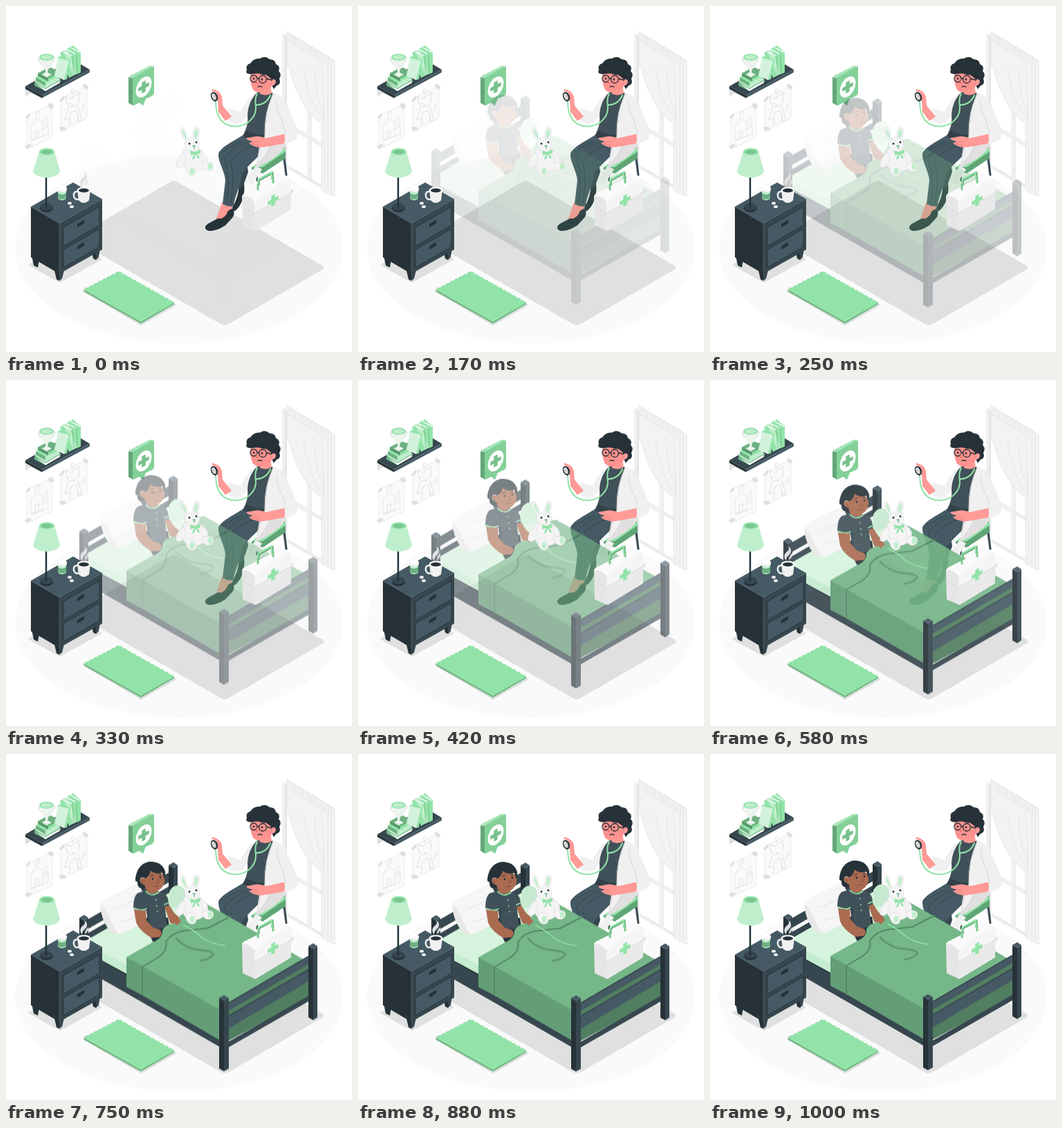
Recreate the animation shown at these times as an HTML page. Size 500 by 500 pixels, loop 1.04 s.

```html
<!DOCTYPE html>
<html lang="en">
<head>
<meta charset="utf-8">
<title>Home visit</title>
<style>
html, body { margin: 0; width: 100%; height: 100%; overflow: hidden; background: #fff; }
svg { display: block; width: 100vw; height: 100vh; }
.ink { fill: #263238; } .slate { fill: #37474f; } .steel { fill: #455a64; } .cloth { fill: #415159; }
.mint { fill: #92e3a9; } .pale { fill: #beeecb; } .leaf { fill: #6db181; }
.snow { fill: #fafafa; } .fog { fill: #f0f0f0; } .ash { fill: #e0e0e0; }
.rose { fill: #ff9a96; } .tan { fill: #aa6b50; } .white { fill: #fff; }
.line { fill: none; stroke-linecap: round; stroke-linejoin: round; }
</style>
</head>
<body>
<svg viewBox="0 0 500 500">
<defs>
  <path id="plus" d="M-2.7-8h5.4v5.3h5v5.4h-5v5.3h-5.4v-5.3h-5v-5.4h5z"/>
</defs>

<ellipse class="snow" cx="250" cy="351" rx="237" ry="137"/>
<path class="ash" d="M238 254Q242 251 247 254L457 375Q462 378 457 381L321 460Q316 463 311 460L97 336Z"/>

<g id="window">
  <path class="fog" d="M399 40L405 43V228L460 260V266L399 231Z"/>
  <path fill="#e6e6e6" d="M403 42L406 44V228L403 227Z"/>
  <path class="white" d="M406 44L456 74V258L406 229Z"/>
  <path class="fog" d="M435 90L441 94V250L435 247ZM406 168L457 197V203L406 174Z"/>
  <path class="line" stroke="#e4e4e4" d="M441 150V249M406 174L435 191M441 194L457 203M413 235L457 261"/>
  <path fill="#f3f3f3" d="M406 37L475 79V275L456 265V171C439 158 420 132 411 94L406 84Z"/>
  <path class="line" stroke="#e5e5e5" d="M406 37L475 79V275L456 266V171C439 158 420 132 411 94L406 84ZM407 50L474 90M430 88C433 115 442 145 459 164M446 92C447 117 450 140 461 157M456 82C459 120 460 150 460 266M465 87V270M470 90V273"/>
  <g id="pleats"></g>
</g>

<g id="drawings">
  <path class="snow" stroke="#ececec" d="M30 158L67 142V190L30 207Z"/>
  <path class="snow" stroke="#ececec" d="M79 133L117 115V162L79 181Z"/>
  <path class="line" stroke="#e3e3e3" d="M36 193V174L45 162L53 168V188ZM53 178L61 174V185L36 195M42 191V181L47 179V189M43 162V154L48 152V160M56 175V163L60 161V173"/>
  <path class="line" stroke="#dedede" d="M88 141L86 130L93 134L101 129L105 124L106 137C104 145 91 150 88 141ZM92 140H93M101 136H102M95 143L98 142M90 148L85 164H91L94 154L102 151L105 166H110L104 145M108 150Q114 151 112 140M93 165L92 172M103 160L104 168M97 128Q91 119 96 121Q102 117 97 128"/>
  <path class="ash" d="M27 202L35 199L37 203L30 207ZM60 142L66 140L70 145L64 149ZM28 162L33 155L36 157L31 163ZM77 175L84 174L88 179L79 181ZM110 114L115 113L120 118L115 121ZM77 137L83 130L85 133L80 139Z"/>
</g>

<g id="shelf">
  <path class="ash" d="M28 121V131L36 126L52 134V131Z"/>
  <path class="slate" d="M28 116L96 77L121 92L52 129Z"/>
  <path class="ink" d="M28 116L52 129V133L28 120Z"/>
  <path class="steel" d="M52 129L121 92V96L52 133Z"/>
  <path class="leaf" d="M41 111L63 99L80 108L57 123L41 115Z"/>
  <path class="pale" d="M41 109L62 97L79 106L57 119Z"/>
  <path class="white" d="M43 112L57 120L78 108V111L57 123Z"/>
  <path class="mint" d="M43 103L65 91L79 99L57 112Z"/>
  <path class="leaf" d="M43 103L57 111V116L43 108Z"/>
  <path class="pale" d="M57 111L79 99V103L57 116Z"/>
  <path class="leaf" d="M46 97L63 88L79 96L61 106Z"/>
  <path fill="#5a9a6e" d="M46 97L61 105V109L46 101Z"/>
  <path class="mint" d="M61 105L79 96V100L61 109Z"/>
  <path class="mint" d="M78 68L83 64L96 70L98 100L91 104Z"/>
  <path class="pale" d="M83 65L90 61L101 67L102 98L97 101Z"/>
  <path class="mint" d="M89 61L97 57L108 67V96L102 99Z"/>
  <path class="line" stroke="#f0f6f1" stroke-width="1.500" d="M82 66L95 72M88 63L100 69M94 60L106 67"/>
  <path class="line" stroke="#7cc290" d="M96 72L98 99M102 69L103 98"/>
  <path class="mint" d="M74 75L79 72L93 78L88 106L83 107Z"/>
  <path fill="#d3f2dc" d="M75 75L91 79L84 107L70 101Z"/>
  <path class="line" stroke="#d5dfd8" stroke-width="1.500" d="M50 74Q44 78 51 84M68 73Q73 77 67 82"/>
  <path fill="#edf3ee" d="M48 74L69 74Q69 88 61 91L60 96L66 99L59 103L52 99L57 96V91Q49 87 48 74Z"/>
  <ellipse cx="58.500" cy="74" rx="10.500" ry="5" class="mint"/>
  <ellipse cx="58.500" cy="74" rx="8" ry="3.300" class="pale"/>
</g>

<g id="bubble">
  <path fill="#a3e6b5" d="M177 102L208 86L214 88L184 104Z"/>
  <path fill="#66a67a" d="M177 103L184 104V144L177 140Z"/>
  <path class="leaf" d="M191 138L198 144L195 137Z"/>
  <path fill="#84d09a" d="M183 105Q183 103 186 102L211 88Q214 86 214 90V125Q214 128 211 130L202 134L198 144L194 139L186 143Q183 145 183 141Z"/>
  <ellipse class="white" transform="translate(199 117) skewY(-28)" rx="11.500" ry="14"/>
  <use href="#plus" fill="#78c18d" transform="translate(199 117) skewY(-28)"/>
</g>

<g id="doctor">
  <path class="line" stroke="#37474f" stroke-width="3" d="M401 176V212L405 244M361 238L363 252"/>
  <path class="mint" d="M355 233L388 209L404 206V212L371 234Z"/>
  <path fill="#5fa576" d="M355 233L371 233L404 210V220L371 242L355 236Z"/>
  <path class="fog" d="M345 253L361 231L370 236L356 259Z"/>
  <path class="rose" d="M312 284L328 287L324 304L303 310Z"/>
  <path class="ink" d="M337 254L344 256C346 272 341 289 330 297L327 291C333 282 337 268 337 254Z"/>
  <path class="ink" d="M288 319C290 314 300 311 306 307Q316 309 321 296L328 292Q331 299 328 305L317 317Q303 326 293 325Q287 323 288 319Z"/>
  <path class="slate" d="M342 190L350 240L342 262L331 266L326 230Z"/>
  <path class="steel" d="M346 184C333 194 313 201 307 213C306 225 316 238 317 252L313 286Q321 291 329 289C330 274 341 257 341 242C350 230 364 219 374 207L371 190Z"/>
  <path class="line" stroke="#37474f" d="M353 196C336 202 319 212 316 222C321 240 323 255 319 286M363 199C344 207 328 216 324 226Q331 244 325 286M311 212Q321 204 342 196"/>
  <path class="ash" d="M366 129L387 126Q403 136 406 160L403 204Q392 220 361 234L365 210L372 160Z"/>
  <path class="fog" d="M364 125C350 130 345 143 339 153L322 148L316 161Q328 174 341 168L355 151Z"/>
  <path class="cloth" d="M364 124Q374 120 386 126L381 142Q374 159 376 181L374 194Q358 198 342 188Q351 172 349 158Q350 137 364 124Z"/>
  <path class="ink" d="M343 188L348 179Q359 187 374 186V194Q357 197 343 188Z" opacity=".5"/>
  <path class="rose" d="M366 116L382 114L384 126Q376 131 367 127Z"/>
  <path class="fog" d="M386 125Q401 129 407 145L421 178Q424 193 412 197L390 202L383 194Q380 211 362 230L374 187Q375 151 386 125Z"/>
  <path class="line" stroke="#d7d7d7" d="M391 138Q391 151 400 168L404 186M388 188Q378 216 364 228M374 187Q373 153 386 128"/>
  <path class="rose" d="M402 185L376 191Q364 187 358 189L347 191Q348 194 357 196L351 198Q358 205 372 204L402 199Q404 191 402 185Z"/>
  <path class="line" stroke="#e5776f" stroke-width=".8" d="M358 196L365 197M355 199L365 201"/>
  <path class="rose" d="M326 160L313 144L312 131Q309 122 298 120L297 122L305 126L299 128L306 138L307 153L317 166Z"/>
  <path class="line" stroke="#92e3a9" stroke-width="2" d="M303 137C303 160 312 174 333 174C351 173 362 159 361 145Q359 134 363 127M382 129Q376 143 361 143"/>
  <ellipse class="ink" cx="301" cy="131" rx="4.800" ry="7" transform="rotate(-23 301 131)"/>
  <ellipse fill="#d7d7d7" cx="300.500" cy="131" rx="2.800" ry="5" transform="rotate(-23 300.500 131)"/>
  <path fill="#fd928e" d="M354 93Q369 89 385 97L386 112Q382 122 372 123Q365 128 357 121Q351 109 354 93Z"/>
  <path class="ink" d="M354 98Q345 99 348 92Q346 85 353 83Q358 75 367 76Q374 71 381 77Q389 77 390 84Q397 87 394 94Q399 99 395 105Q398 113 391 115L387 120L384 114L383 105Q377 99 371 98Q361 97 354 98Z"/>
  <path class="rose" d="M383 107Q390 104 390 110Q388 116 384 115Z"/>
  <circle class="ink" cx="387" cy="116" r="1.800"/>
  <g class="line" stroke="#263238" stroke-width="1.300">
    <circle cx="358" cy="105" r="5"/>
    <circle cx="371" cy="106" r="5.500"/>
    <path d="M363 105H366M376 105L384 107M354 98L359 97M368 98L374 99M364 117Q367 115 370 117"/>
  </g>
  <circle class="ink" cx="358" cy="105" r="1.400"/>
  <circle class="ink" cx="370" cy="106" r="1.400"/>
  <path class="line" stroke="#d96861" d="M363 106L361 111L364 112"/>
</g>

<g id="bed">
  <path class="ink" d="M106 235L113 239V306L106 302ZM235 159L242 163V226L235 222Z"/>
  <path class="slate" d="M113 239L119 235V302L113 306ZM242 163L248 159V222L242 226Z"/>
  <path class="steel" d="M106 235L113 231L119 235L113 239ZM235 159L242 155L248 159L242 163Z"/>
  <path class="slate" d="M119 237L235 170V184L119 251ZM119 257L235 190V211L119 278Z"/>
  <path class="ink" d="M119 283L308 392V421L119 312Z"/>
  <path class="slate" d="M113 283L308 395V421L113 309Z"/>
  <path fill="#d6f3de" d="M119 266L236 199L300 240L174 309L119 276Z"/>
  <path fill="#c4ecd0" d="M119 274L176 304V317L119 286Z"/>
  <path fill="#c6ead0" d="M236 197Q242 186 253 189L262 199L261 218L237 221Z"/>
  <path fill="#f6f6f6" d="M136 220Q134 212 148 206L181 189Q192 184 197 197L212 236L168 258Q156 261 149 252Q140 239 136 220Z"/>
  <path fill="#e8e8e8" d="M136 218Q143 219 148 232Q154 247 162 258Q154 261 147 250Q138 237 136 218Z"/>
  <path class="line" stroke="#e3e3e3" d="M158 222Q174 215 184 211M165 241L188 234"/>

  <g id="child">
    <path class="ink" d="M192 235H234L238 259L213 271L202 250Z"/>
    <path class="tan" d="M203 191H219L221 201Q211 207 202 199Z"/>
    <path class="cloth" d="M202 196Q211 204 221 197Q231 199 234 207L236 219L230 223L233 248Q222 254 206 251L203 225L184 222Q184 203 191 199Z"/>
    <path class="line" stroke="#92e3a9" stroke-width="1.700" d="M202 197Q211 206 221 198M185 221Q195 226 203 222M229 216L236 213"/>
    <path class="slate" d="M203 225Q207 217 204 211Q209 233 207 250Z"/>
    <g class="mint"><circle cx="217" cy="209" r="1"/><circle cx="218" cy="218" r="1"/><circle cx="219" cy="226" r="1"/></g>
    <path class="tan" d="M185 223L202 225L203 239L212 249L223 253Q227 258 222 263L210 264Q193 254 188 242Z"/>
    <path class="tan" d="M229 219L236 217L243 228L252 236V242L246 247L237 242Z"/>
    <path class="tan" d="M200 170Q213 161 226 172Q232 180 227 189Q222 197 213 197Q203 197 199 189L194 185Q192 175 200 178Z"/>
    <path class="ink" d="M190 183Q185 184 188 173Q192 157 207 154Q225 153 230 168Q231 174 228 177L226 170Q216 173 209 167Q207 176 201 178Q192 174 194 184L201 189Q202 194 197 193Q189 192 190 183Z"/>
    <path class="line" stroke="#824c3c" d="M196 181L199 185M219 179L221 184L218 185M214 190Q218 190 221 189"/>
    <path class="line" stroke="#263238" d="M209 175L213 173M221 173L224 173"/>
    <circle class="ink" cx="212" cy="179" r="1.400"/><circle class="ink" cx="223" cy="177" r="1.400"/>
  </g>

  <path fill="#75b788" d="M174 292L213 270Q227 264 226 253Q231 244 246 242L260 219L286 213L302 222L440 301L309 378Z"/>
  <path fill="#649e77" d="M174 292L309 368V412L197 347L174 335Z"/>
  <path fill="#517e60" d="M308 370L440 299V349L308 420Z"/>
  <path class="line" stroke="#55886a" stroke-width="2" d="M197 347V306L219 293Q234 283 231 270Q239 257 256 254L292 250L325 233"/>
  <path class="line" stroke="#5f9972" stroke-width="3" d="M246 265Q261 281 283 282Q302 284 299 289Q292 296 281 297"/>
  <path class="line" stroke="#92e3a9" stroke-width="1.500" d="M257 246Q272 253 282 263Q296 273 316 275"/>
  <path class="tan" d="M237 232L249 235L253 240L247 246L240 240Z"/>
  <path class="slate" d="M322 357L437 290V302L322 369ZM322 376L437 309V313L322 380Z"/>
  <path class="steel" d="M322 359L437 292V302L322 369ZM322 378L437 311V327L322 395Z"/>
  <path class="slate" d="M322 414L437 348V356L322 422Z"/>
  <path class="ink" d="M308 351L315 355V457L308 453ZM437 276L444 280V383L437 379Z"/>
  <path class="slate" d="M315 355L322 351V453L315 457ZM444 280L450 276V379L444 383Z"/>
  <path class="steel" d="M308 351L315 347L322 351L315 355ZM437 276L444 272L450 276L444 280Z"/>
</g>

<g id="bunny" fill="#f4f4f4" stroke="#dedede" stroke-width=".7">
  <path d="M259 194Q250 185 253 176Q258 172 262 193ZM270 192Q269 177 276 174Q283 178 276 195Z"/>
  <path class="pale" stroke="none" d="M260 192Q253 185 255 178Q259 182 261 193ZM272 191Q271 179 276 177Q280 181 274 192Z"/>
  <path d="M257 207Q271 201 283 209L291 226Q287 239 271 240Q256 239 253 222Z"/>
  <path d="M257 211Q244 221 246 232Q254 237 260 224ZM281 209Q294 216 291 226L284 227Z"/>
  <ellipse cx="269" cy="200" rx="11" ry="10"/>
  <path d="M259 231Q268 226 274 235Q277 246 268 246Q260 244 259 231ZM283 229Q291 223 299 228Q302 238 292 239Q284 238 283 229Z"/>
  <g class="pale" stroke="none"><ellipse cx="269" cy="239" rx="3.500" ry="5"/><ellipse cx="295" cy="232" rx="3.500" ry="5"/></g>
  <path class="mint" stroke="none" d="M273 211L266 209L267 216L273 213L280 214L281 207ZM272 213L269 222L272 221L274 214L278 221L280 219L275 212Z"/>
  <g class="ink" stroke="none"><circle cx="265" cy="199" r="1.400"/><circle cx="275" cy="197" r="1.400"/></g>
  <path class="line" stroke="#6db181" stroke-width="1.300" d="M270 202H273L272 204V206"/>
</g>

<g id="bag">
  <path class="ash" d="M406 262L416 266L412 272Z"/>
  <path class="line" stroke="#6db181" stroke-width="3.500" d="M365 263V252L385 241V255"/>
  <path class="line" stroke="#92e3a9" stroke-width="2" d="M364 263V251L384 240V254"/>
  <path class="snow" d="M341 276Q341 272 346 270L392 247Q396 245 400 247L409 248L363 285Z"/>
  <path fill="#e6e6e6" d="M341 275Q346 273 355 279Q360 282 360 289V325L342 317Z"/>
  <path fill="#f5f5f5" d="M359 286Q360 281 366 277L406 250Q412 247 412 254V293L359 325Z"/>
  <path fill="#e9e9e9" d="M359 300L412 269V294L361 325L359 324Z"/>
  <path class="line" stroke="#d9d9d9" stroke-width=".8" d="M342 291L359 300L412 269"/>
  <path class="line" stroke="#7cc891" stroke-width="3" d="M364 265V258M386 255V248"/>
  <use href="#plus" class="mint" transform="translate(386 281) skewY(-28)"/>
</g>

<g id="nightstand">
  <path class="ash" d="M31 374L78 400L139 366L98 340Z"/>
  <path class="ink" d="M37 360L48 367L46 378L40 375ZM70 382L77 386V397L73 395ZM124 356L130 352V367L126 365Z"/>
  <path class="slate" d="M77 386L84 382L81 394L77 397ZM130 352L136 350L134 363L130 367Z"/>
  <path class="steel" d="M36 290L97 255L139 279L77 314Z"/>
  <path class="ink" d="M36 290L77 314V387L36 363Z"/>
  <path class="slate" d="M77 314L139 279V352L77 387Z"/>
  <path class="steel" stroke="#263238" d="M83 320L135 290V317L83 347ZM83 352L135 322V348L83 378Z"/>
  <path class="ink" d="M103 315L113 309V314L103 320ZM103 347L113 341V346L103 352Z"/>
  <path class="line" stroke="#53656e" stroke-width=".8" d="M36 290L77 314L139 279M77 314V387"/>

  <ellipse class="ink" cx="58.500" cy="292" rx="9.500" ry="6"/>
  <ellipse class="slate" cx="58.500" cy="290" rx="9" ry="5"/>
  <path class="line" stroke="#263238" stroke-width="2.500" d="M58 243V290"/>
  <path class="pale" d="M48 210H70L78 239Q75 247 59 248Q42 247 39 239Z"/>
  <ellipse class="mint" cx="59" cy="210.500" rx="11" ry="5"/>
  <ellipse fill="#7cc690" cx="59" cy="211" rx="8" ry="3.300"/>

  <path class="pale" d="M75 266V278Q81 284 87 278V266Z"/>
  <path class="leaf" d="M75 270Q81 275 87 270V277Q81 282 75 277Z"/>
  <path class="fog" d="M75 263V267Q81 272 88 267V263Z"/>
  <ellipse class="white" cx="81.500" cy="263" rx="6.500" ry="3"/>
  <g class="fog"><ellipse cx="92" cy="285" rx="3" ry="2"/><ellipse cx="95" cy="290" rx="3" ry="2"/></g>
  <path class="line" stroke="#f0f0f0" stroke-width="2.500" d="M105 268Q97 267 98 275Q100 282 107 278"/>
  <path class="fog" d="M103 266H122L120 281Q112 288 105 281Z"/>
  <ellipse class="white" cx="112.500" cy="266" rx="9.800" ry="4.500"/>
  <ellipse class="ink" cx="112.500" cy="266.500" rx="7.500" ry="3"/>
  <path class="ash" d="M110 261Q104 254 111 248Q116 245 113 240Q121 246 114 253Q110 256 110 261ZM114 260Q114 255 119 250Q120 256 114 260Z"/>
</g>

<g id="mat">
  <path class="ash" d="M110 412L114 407L244 430L246 433L195 462Z"/>
  <path fill="#74b986" d="M113 410L195 456L243 428V431L195 459L113 413Z"/>
  <path class="mint" id="fringe"/>
</g>
</svg>

<script>
const $ = id => document.getElementById(id);

// Points along an edge, alternately pushed up to make a ragged border.
function ragged(x1, y1, x2, y2, count, lift) {
  let path = '';
  for (let i = 0; i <= count; i++) {
    const k = i / count, up = i % 2 ? lift : 0;
    path += `L${x1 + (x2 - x1) * k} ${y1 + (y2 - y1) * k - up}`;
  }
  return path;
}
$('fringe').setAttribute('d', 'M195 456' +
  ragged(113, 410, 163, 384, 16, 1.6) + ragged(163, 384, 243, 429, 24, 1.6) + 'Z');

let pleats = '';
for (let x = 410; x < 474; x += 4) pleats += `M${x} ${40 + (x - 410) * .6}v11`;
$('pleats').innerHTML = `<path class="line" stroke="#e2e2e2" d="${pleats}"/>`;

// The bed drops in with a slight overshoot, in 25 even steps per loop.
const LOOP = 1040, STEPS = 25;
const drop = $('bed').animate([
  { opacity: 0, transform: 'translateY(-30px)' },
  { opacity: 1, transform: 'translateY(0)' }
], { duration: LOOP, easing: 'cubic-bezier(.36,-.01,.5,1.38)', fill: 'both' });
drop.pause();

const start = performance.now();
function draw() {
  const time = (performance.now() - start) % LOOP;
  // Steps begin on whole hundredths of a second.
  const step = Math.min(STEPS - 1, Math.floor((time + 5) * STEPS / LOOP));
  drop.currentTime = (step + 1) * LOOP / STEPS;
  requestAnimationFrame(draw);
}
draw();
</script>
</body>
</html>
```
